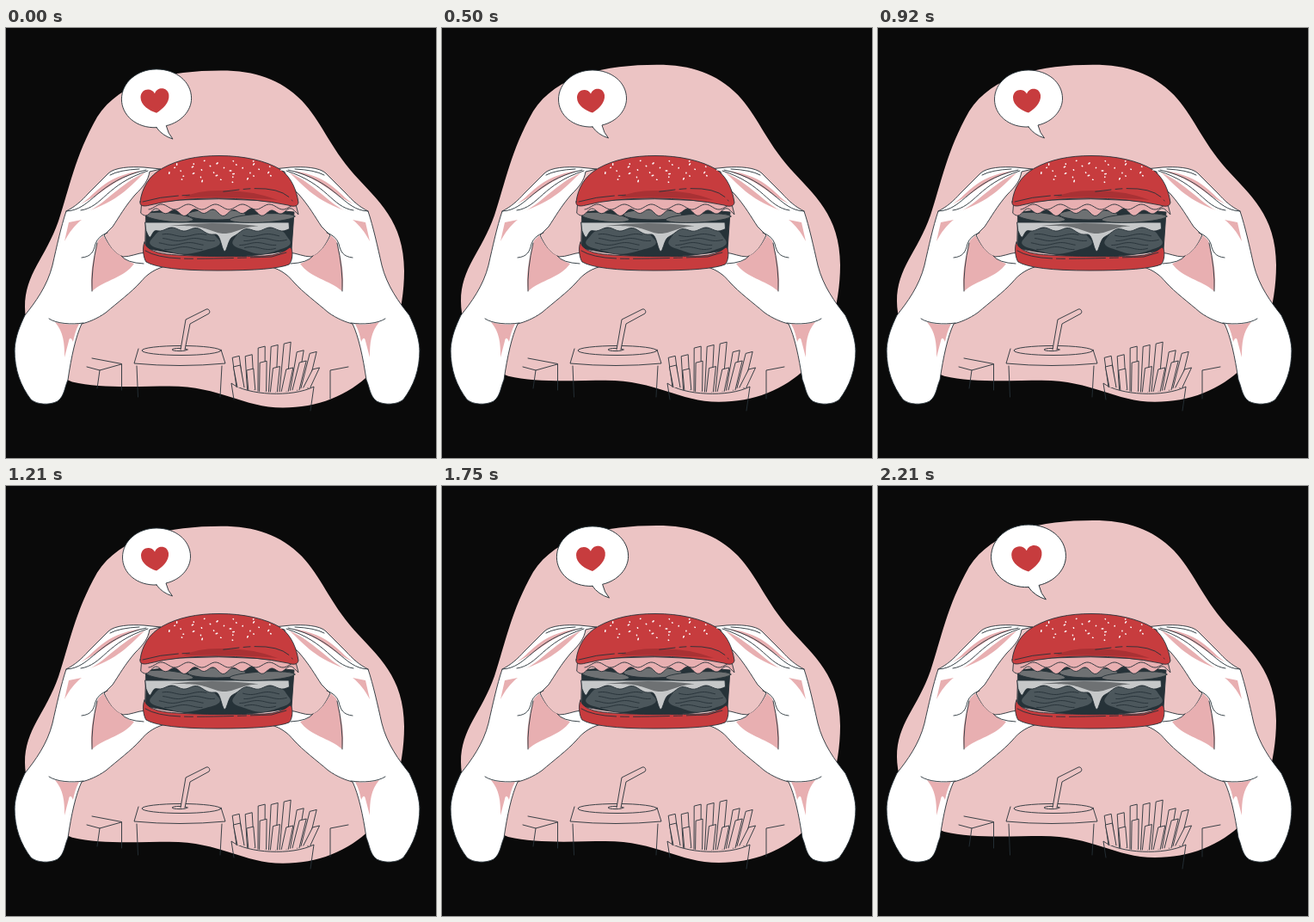
Animation of 500x500 px, one loop 2250 ms. Source, as an HTML page:

```html
<!DOCTYPE html>
<html lang="en">
<head>
<meta charset="utf-8">
<title>Burger in hands</title>
<style>
html, body { margin: 0; width: 100%; height: 100%; overflow: hidden; background: #0a0a0a; }
svg { display: block; width: 100%; height: 100%; }
.ink { stroke: #263238; stroke-width: .9; stroke-linecap: round; stroke-linejoin: round; }
.line { fill: none; }
.white { fill: #fff; }
.pink { fill: #ecc4c4; }
.blush { fill: #e8afb1; }
.red { fill: #c73c3e; }
.deep { fill: #a93134; }
.dark { fill: #263238; }
.gray { fill: #6e7173; }
.meat { fill: #4c575c; }
.cheese { fill: #c6c8c9; }
</style>
</head>
<body>
<svg viewBox="0 0 500 500">
  <defs>
    <g id="hand">
      <path class="white ink" d="M10 374 C11 358 16 347 22 334 C34 319 48 300 54 276 C59 254 64 231 70 213 C80 208 88 201 96 192 L119 169 C126 162 145 161 160 162 L180 164 L167 167 C165 178 160 184 150 194 C138 208 132 219 124 231 L114 241 C119 252 126 263 136 266 C145 266 152 262 162 261 L190 276 C174 279 164 286 156 296 C146 307 130 319 116 331 C106 338 96 342 88 344 C81 359 76 382 72 409 C68 418 68 428 60 434 C50 439 36 438 29 432 C17 416 10 398 10 374Z"/>
      <path class="blush" d="M113 241 C119 252 126 262 134 265 C138 269 143 272 149 274 C138 290 115 293 100 306 C97 290 101 267 107 247Z"/>
      <path class="blush" d="M98 212 C116 203 133 181 162 168 C146 181 136 198 98 212Z M86 205 C102 197 112 172 158 166 C122 177 112 194 86 205Z"/>
      <path class="blush" d="M73 226 L88 223 C80 229 74 237 68 248Z"/>
      <path class="blush" d="M57 342 Q71 346 85 344 C81 351 79 359 78 365 C76 360 74 359 73 364 L68 383 C68 366 67 354 57 342Z"/>
      <path class="ink line" d="M70 213 C100 212 105 178 163 165 M87 212 C113 208 116 182 165 166 M121 171 Q132 165 155 164
        M88 267 C99 266 102 260 104 251 Q107 242 118 238 M106 250 Q99 280 100 306 M134 265 Q140 273 160 274 M50 338 C59 344 76 345 90 343"/>
    </g>
  </defs>

  <path id="blob" class="pink" d="M250 50 C290 50 319 60 344 85 C366 108 376 138 405 171 C432 201 463 225 463 283 C463 330 448 380 424 402 C398 428 362 442 322 442 C275 442 250 417 190 417 C155 417 110 420 77 412 C45 400 22 360 22 325 C22 286 46 268 61 225 C74 186 80 150 106 104 C133 62 190 50 250 50Z"/>

  <g class="ink line">
    <path d="M100 384 L134.500 390.500 V421 M94 394 L109 398 L134 391 M109 398 L106 419"/>
    <path d="M377 431 V398 L398 394"/>
    <ellipse cx="204" cy="375" rx="46" ry="5.500"/>
    <ellipse cx="202" cy="374" rx="9" ry="1.600"/>
    <path d="M154 373 L149 390 Q202 395 255 390 L250 374 M152 393 L153.500 429 M251 393 L249 429"/>
    <path class="pink" d="M203 374 L209 339 L233 327 C236 326 238 330 236 332 L214 344 L208 374"/>
    <path d="M265 432 L262 413 C280 427 333 430 358 417 L354 445"/>
  </g>
  <g id="fries"></g>

  <use href="#hand"/>
  <use href="#hand" transform="matrix(-1 0 0 1 491 0)"/>

  <path class="dark ink" d="M163 214 Q248 204 335 214 L332 258 Q248 275 162 256Z"/>
  <g id="patty"></g>
  <g class="gray ink">
    <ellipse cx="245" cy="217" rx="34" ry="6"/>
    <ellipse cx="190" cy="220" rx="28" ry="5" transform="rotate(6 190 220)"/>
    <ellipse cx="298" cy="221" rx="38" ry="5" transform="rotate(-3 298 221)"/>
  </g>
  <g id="lettuce"></g>
  <path class="red ink" d="M161 249 C158 256 160 268 163 272 Q180 282 246 282 T329 275 C334 271 334 255 330 255 Q320 264 301 265 C268 266 215 266 187 263 Q163 260 161 249Z"/>
  <path class="ink line" stroke-dasharray="42 5 10 5" d="M162 259 Q175 267 203 268 T309 266 L326 261"/>
  <path class="red ink" d="M156 202 C158 186 166 172 182 163 C200 153 222 148.500 248 148.500 C276 148.500 302 154 320 165 C333 175 338 190 340 203 C339 208 334 208 328 206 Q290 198 244 198 T167 206 C160 208 155 207 156 202Z"/>
  <path class="deep" d="M206 197 Q222 189 247 189 Q285 188 316 200 Q260 195 206 197Z"/>
  <path class="ink line" stroke-dasharray="42 5 8 40 18 5 8 5" d="M159 202 Q180 196 201 195 T271 188 T333 201"/>
  <g id="seeds" stroke="#fff" stroke-width="1.500" stroke-linecap="round"></g>

  <g id="bubble">
    <path class="white ink" d="M175 115 C152 116 135.500 101 135.500 83 C135.500 64 153 49 175 49 C197 49 214.500 63 214.500 82 C214.500 96 203 109 186 113 Q188 122 193.500 128 Q181 124 175 115Z"/>
    <path class="red" d="M175 98.500 C167 96 157 90 157 81 C157 71 169 69 173 76.500 C176 68 188 69 189 78 C190 87 182 94 175 98.500Z"/>
  </g>
</svg>
<script>
const { sin, cos, exp, abs, sqrt, PI } = Math;
const el = id => document.getElementById(id);
const bump = (x, mid, width) => exp(-(((x - mid) / width) ** 2));

function add(parent, d, cls = "") {
  const path = document.createElementNS("http://www.w3.org/2000/svg", "path");
  path.setAttribute("d", d);
  path.setAttribute("class", cls);
  el(parent).append(path);
}

function curve(x0, x1, f) {
  const pts = [];
  for (let x = x0; x <= x1; x += 1.5) pts.push(`${x} ${f(x).toFixed(2)}`);
  return "M" + pts.join("L");
}

// Fries fan out from the middle of the box
function stick(x, top, width) {
  const base = 423 - 8 * ((x - 308) / 48) ** 2;
  const lean = (x - 292) * .2;
  add("fries", `M${x} ${base} L${x + lean} ${top} l${width} -2 L${x + width} ${base}`, "pink ink");
}
for (let i = 0; i < 7; i++) {
  const x = 268 + i * 12.5;
  stick(x, 364 + .45 * abs(x - 311) + 4 * (i % 2), 8);
}
for (let i = 0; i < 7; i++) stick(269 + i * 12.8, 394 + 5 * sin(i * 2.2), 8);

function meat(cx, rx) {
  const pts = [];
  for (let a = 0; a < 2 * PI; a += .1) {
    const r = 1 + .05 * sin(5 * a);
    pts.push(`${cx + rx * r * cos(a)} ${247 + 15 * r * sin(a)}`);
  }
  add("patty", "M" + pts.join("L") + "Z", "meat");
  for (let i = 0; i < 4; i++) {
    const half = rx * (.75 - .1 * abs(i - 1));
    const shift = 5 * sin(i * 2);
    add("patty", curve(cx + shift - half, cx + shift + half,
      x => 241 + i * 5 + 1.5 * sin(x * .16 + i)), "ink line");
  }
}
meat(208, 40);
meat(297, 33);

const melt = x => 234 + 2 * sin(x * .22) + 8 * bump(x, 254, 20)
  + 19 * bump(x, 254, 5) + 11 * bump(x, 167, 4);
add("patty", curve(163, 330, melt) + "L329 226 H162Z", "cheese ink");
add("patty", curve(190, 294, x => 230 + 9 * bump(x, 254, 22)) + "Q240 224 190 230Z", "gray");

const frill = x => 214 + 3 * sin(x * .28) + 1.5 * sin(x * .13);
add("lettuce", curve(157, 340, frill) + "L337 205 Q248 193 158 204Z", "blush ink");
add("lettuce", curve(166, 334, x => 208 + 3 * sin(x * .2)), "ink line");

// Golden-angle scatter over the bun
const SEEDS = 36;
for (let i = 0; i < SEEDS; i++) {
  const a = i * 2.4, r = sqrt((i + .5) / SEEDS), size = i % 3 ? .5 : 1.5;
  add("seeds", `M${252 + 70 * r * cos(a)} ${166 + 14 * r * sin(a)} l${size * cos(i)} ${size * sin(i)}`);
}

const LOOP = 2250, CYCLE = 1500, LEAD = 40;

// Two linear beats per cycle: one falls over .2, one rises and falls over .1
function beat(p) {
  const first = p < .1 ? p / .1 : (.3 - p) / .2;
  const second = 1 - abs(p - .5) / .1;
  return 1 + .1 * Math.max(0, first, second);
}

function draw(t) {
  const p = (t % LOOP + LEAD) % CYCLE / CYCLE;
  const lift = 10 * (1 - abs(2 * p - 1));
  el("blob").setAttribute("transform", `translate(0 ${-lift})`);
  el("bubble").setAttribute("transform",
    `translate(175 88.5) scale(${beat(p)}) translate(-175 -88.5)`);
}

const start = performance.now();
function tick() {
  draw(performance.now() - start);
  requestAnimationFrame(tick);
}
tick();
</script>
</body>
</html>
```
